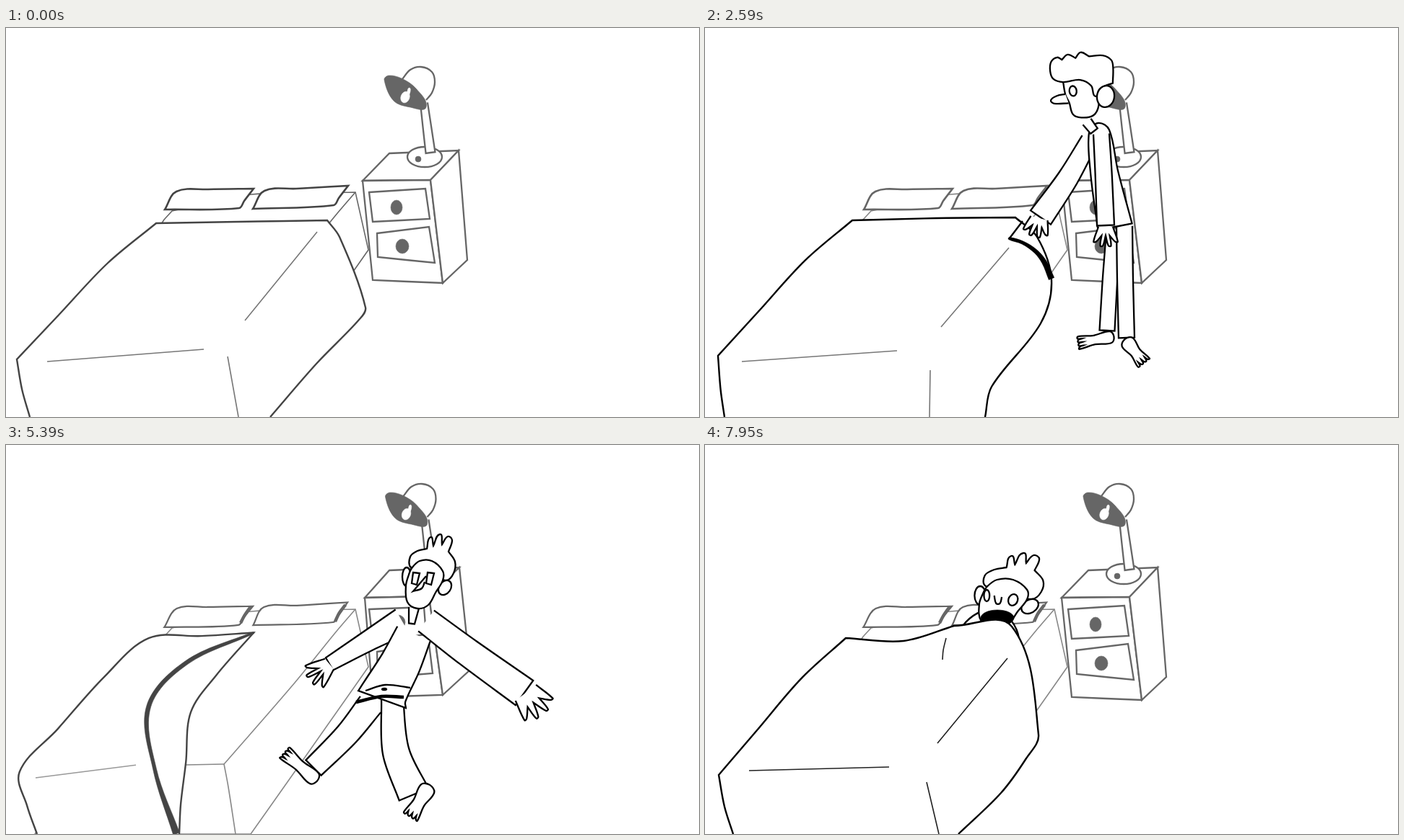
Recreate the animation shown at these times as an HTML page with a canvas. Size 960 by 540 pixels, loop 8 s.

```html
<!DOCTYPE html>
<html lang="en">
<head>
<meta charset="utf-8">
<title>Going to bed</title>
<style>
html, body { margin: 0; width: 100%; height: 100%; overflow: hidden; background: #fff; }
canvas { display: block; width: 960px; height: 540px; }
</style>
</head>
<body>
<canvas id="stage" width="960" height="540"></canvas>
<script>
const ctx = document.getElementById('stage').getContext('2d');
const LOOP = 8000;
const { sin, cos, PI, min, max, hypot, atan2 } = Math;

const span = (t, from, to) => max(0, min(1, (t - from) / (to - from)));
const ease = k => k * k * (3 - 2 * k);
const lerp = (a, b, k) => a + (b - a) * k;
const pairs = nums => Array.from({ length: nums.length / 2 }, (_, i) => nums.slice(2 * i, 2 * i + 2));
const blend = (a, b, k) => Object.fromEntries(Object.keys(a).map(
  key => [key, a[key].map((v, i) => lerp(v, b[key][i], k))]));

// ---- Pen -------------------------------------------------------------
let pen;
const setPen = (ink, width = 2.2, wobble = 0) => { pen = { ink, width, wobble }; };

// Line weight stays the same under any transform of the path.
function finish(kind) {
  ctx.save();
  ctx.setTransform(1, 0, 0, 1, 0, 0);
  ctx.fillStyle = kind === 'b' ? pen.ink : '#fff';
  ctx.strokeStyle = pen.ink;
  ctx.lineWidth = kind === 'b' ? .6 : kind === '=' ? pen.width * 2 : pen.width;
  if (kind !== '-' && kind !== '=') ctx.fill();
  ctx.stroke();
  ctx.restore();
}

// Smooth curve through points; a doubled point is a sharp corner.
// Kinds: - line, = heavy line, o open white, c closed white, b solid.
function paint(kind, points) {
  const closed = kind === 'c' || kind === 'b';
  const p = points.map(([x, y]) => y >= 540 ? [x, y]
    : [x + pen.wobble * sin(x * .7 + y), y + pen.wobble * cos(x + y * .6)]);
  const n = p.length;
  const at = i => closed ? p[(i + n) % n] : p[max(0, min(n - 1, i))];
  ctx.beginPath();
  ctx.moveTo(...p[0]);
  for (let i = 0; i < n - !closed; i++) {
    const [a, b, c, d] = [at(i - 1), at(i), at(i + 1), at(i + 2)];
    const reach = hypot(c[0] - b[0], c[1] - b[1]) / 3;
    const handle = (from, to) => {
      const angle = atan2(to[1] - from[1], to[0] - from[0]);
      return [cos(angle) * reach, sin(angle) * reach];
    };
    const [ux, uy] = handle(a, c), [vx, vy] = handle(b, d);
    ctx.bezierCurveTo(b[0] + ux, b[1] + uy, c[0] - vx, c[1] - vy, ...c);
  }
  if (closed) ctx.closePath();
  finish(kind);
}

// "x,y x,y! ..." with "!" for a corner.
const shape = (kind, text) => paint(kind, text.split(' ').flatMap(token => {
  const point = token.split(',').map(parseFloat);
  return token.endsWith('!') ? [point, point] : [point];
}));
const line = (...nums) => paint('-', pairs(nums));

function oval(x, y, rx, ry, degrees = 0, kind = 'c') {
  ctx.beginPath();
  ctx.ellipse(x, y, rx, ry, degrees * PI / 180, 0, 2 * PI);
  finish(kind);
}

function place({ x = 0, y = 0, turn = 0, px = 0, py = 0, sx = 1, sy = sx }, inside) {
  ctx.save();
  ctx.translate(px + x, py + y);
  ctx.rotate(turn * PI / 180);
  ctx.scale(sx, sy);
  ctx.translate(-px, -py);
  inside();
  ctx.restore();
}

// Tapered tube along a centre line: start width, end width, points.
function tube([w0, w1, ...nums], { cap = false, kind } = {}) {
  const mid = pairs(nums), last = mid.length - 1, left = [], right = [];
  mid.forEach(([x, y], i) => {
    const [ax, ay] = mid[max(0, i - 1)], [bx, by] = mid[min(last, i + 1)];
    const angle = atan2(by - ay, bx - ax), half = lerp(w0, w1, i / last) / 2;
    left.push([x + half * sin(angle), y - half * cos(angle)]);
    right.unshift([x - half * sin(angle), y + half * cos(angle)]);
    if (cap && i === 0) left.unshift([x - .4 * w0 * cos(angle), y - .4 * w0 * sin(angle)]);
  });
  paint(kind || (cap ? 'c' : 'o'), [...left, left.at(-1), right[0], ...right]);
}

// ---- Figure ----------------------------------------------------------
function hand([x, y, turn, length, width]) {
  const points = [[0, -width / 2]];
  for (let i = 0; i < 4; i++) {
    const side = (i - 1.5) / 1.5, tip = length * (1 - .15 * side * side);
    const tx = cos(side * .45) * tip, ty = side * width * .25 + sin(side * .45) * tip;
    points.push([tx, ty - 1.8], [tx, ty + 1.8]);
    const valley = [length * .45, (i - 1) * width * .28];
    if (i < 3) points.push(valley, valley);
  }
  points.push([0, width / 2]);
  place({ x, y, turn }, () => paint('o', points));
}

function foot([x, y, toeX, toeY, width]) {
  const length = hypot(toeX - x, toeY - y);
  const points = [[0, -.45 * width], [-.25 * width, 0], [0, .45 * width], [length * .5, .35 * width]];
  for (let i = 0; i < 4; i++) {
    const across = width * (.4 - i * .27), valley = [length - 6, across - width * .13];
    points.push([length - 1, across + 1.5], [length, across - 1.5]);
    if (i < 3) points.push(valley, valley);
  }
  points.push([length * .5, -.35 * width]);
  place({ x, y, turn: atan2(toeY - y, toeX - x) * 180 / PI }, () => paint('c', points));
}

// Side view, built around the ear.
function profile([x, y, turn, sx]) {
  place({ x, y, turn, sx }, () => {
    shape('o', '-56,-27 -55,-9 -51,3 -48,19 -37,25 -20,24 -11,11 -12,-4! -12,-30');
    shape('o', '-55,-10! -67,-9 -76,-4 -72,1 -52,3');
    shape('c', '-56,-27 -69,-33 -72,-44 -69,-57 -60,-62 -54,-58! -45,-64 -35,-58! -27,-65 -16,-58! 3,-57 14,-49 15,-37 12,-17! 2,-15 -8,-10 -12,-2 -16,-4 -18,-17 -32,-27');
    oval(0, 0, 12, 15, 15);
    oval(-44, -13, 5, 7);
  });
}

// Front view, built around the point between the ears.
function frontHead(x, y, sx, features) {
  place({ x, y, sx, sy: 1 }, () => {
    shape('c', '-20,-20 -21,-35 -11,-43 2,-46! 7,-62 11,-50! 20,-66 23,-52! 31,-63 37,-58 32,-42! 41,-28 39,-12 29,-2 9,-10');
    oval(-26, -7, 6, 13);
    oval(27, 8, 8, 11, 35);
    shape('c', '-23,-10 -27,5 -25,28 -11,37 4,32 14,15 24,-2 24,-15 9,-29 -8,-29 -19,-19');
    features();
  });
}

// Limbs: widths and centre line. Hands: place, angle, length, width.
// Feet: heel, toes, width. Head: ear, angle, size.
const WALK = {
  backLeg: [30, 18, 575, 290, 557, 338, 603, 401], backFoot: [613, 405, 591, 431, 18],
  frontLeg: [38, 26, 583, 268, 567, 340, 569, 419], frontFoot: [577, 431, 510, 436, 17],
  backArm: [16, 16, 560, 150, 565, 200, 572, 255], backHand: [572, 255, 90, 6, 10],
  torso: [34, 45, 558, 145, 563, 195, 580, 265], neck: [17, 6, 548, 130, 546, 152],
  frontArm: [20, 20, 567, 155, 567, 200, 572, 279], frontHand: [574, 280, 90, 29, 19],
  head: [554, 92, -44, .84]
};
const REACH = {
  backLeg: [20, 21, 566, 283, 561, 350, 557, 420], backFoot: [562, 429, 517, 437, 18],
  frontLeg: [22, 22, 581, 275, 582, 350, 584, 430], frontFoot: [585, 436, 608, 465, 21],
  backArm: [24, 34, 533, 155, 503, 208, 465, 263], backHand: [463, 264, 105, 26, 24],
  torso: [28, 48, 546, 143, 553, 200, 568, 276], neck: [14, 12, 529, 130, 539, 143],
  frontArm: [22, 24, 549, 147, 552, 200, 555, 274], frontHand: [555, 276, 90, 27, 20],
  head: [555, 95, -7, 1]
};
const STAND = {
  backLeg: [22, 25, 557, 278, 556, 350, 555, 414], backFoot: [565, 426, 522, 434, 20],
  frontLeg: [34, 28, 561, 278, 573, 340, 582, 412], frontFoot: [579, 427, 609, 455, 22],
  backArm: [16, 16, 553, 170, 553, 200, 555, 262], backHand: [555, 262, 90, 6, 10],
  torso: [34, 47, 552, 156, 552, 205, 554, 277], neck: [18, 12, 546, 122, 546, 150],
  frontArm: [20, 23, 560, 180, 562, 220, 567, 276], frontHand: [567, 277, 90, 20, 21],
  head: [572, 99, 0, 1]
};
const LIE = {
  backLeg: [30, 30, 672, 413, 600, 418, 525, 420], backFoot: [513, 440, 513, 392, 14],
  frontLeg: [34, 35, 672, 417, 600, 421, 519, 422], frontFoot: [513, 438, 512, 391, 15],
  backArm: [10, 20, 755, 393, 715, 384, 680, 379], backHand: [680, 379, 178, 25, 17],
  torso: [28, 48, 803, 413, 740, 412, 674, 413], neck: [14, 18, 825, 402, 799, 404],
  frontArm: [22, 27, 798, 424, 750, 451, 692, 483], frontHand: [692, 487, 164, 56, 25],
  head: [858, 405, 48, .97]
};
const LEAP = {
  backLeg: [36, 30, 325, 320, 292, 362, 246, 408], backFoot: [247, 423, 206, 387, 21],
  frontLeg: [30, 44, 355, 312, 360, 385, 385, 445], frontFoot: [404, 437, 380, 476, 24],
  backArm: [38, 20, 369, 205, 325, 230, 268, 264], backHand: [268, 264, 140, 35, 19],
  torso: [50, 70, 385, 222, 367, 262, 345, 302, 341, 313], neck: [14, 8, 385, 186, 382, 208],
  frontArm: [36, 42, 402, 204, 460, 248, 538, 304], frontHand: [540, 304, 52, 38, 36]
};
const swapLegs = p => ({
  ...p, backLeg: p.frontLeg, backFoot: p.frontFoot, frontLeg: p.backLeg, frontFoot: p.backFoot
});

function legs(p) {
  tube(p.backLeg); foot(p.backFoot);
  tube(p.frontLeg); foot(p.frontFoot);
}

function sideFigure(p, move = {}) {
  place(move, () => {
    legs(p);
    tube(p.backArm); hand(p.backHand);
    tube(p.torso, { cap: true }); tube(p.neck);
    tube(p.frontArm); hand(p.frontHand);
    profile(p.head);
  });
}

function leaper(move) {
  place(move, () => {
    legs(LEAP);
    tube(LEAP.backArm); hand(LEAP.backHand);
    tube(LEAP.frontArm); hand(LEAP.frontHand);
    tube(LEAP.torso); tube(LEAP.neck);
    shape('-', '318,301 345,293 380,297');
    shape('=', '305,317 340,309 371,310');
    oval(344, 299, 4, 2, 0, 'b');
    frontHead(401, 150, 1, () => {
      for (const x of [-17, 3]) paint('c', pairs([x, -13, x, -13, x + 9, -12, x + 9, -12, x + 5, 4, x + 5, 4, x - 2, 2, x - 2, 2]));
      shape('-', '1,-8 -17,13! -5,9 -1,0');
    });
  });
}

function walk(t) {
  const left = max(0, 1390 - t) / 80;
  const stride = .5 - .5 * cos(left * PI / 4);
  const arrive = ease(span(t, 1710, 2190));
  const stepping = blend(WALK, swapLegs(WALK), stride);
  sideFigure(blend(stepping, REACH, arrive), { x: left * 45 });
}

function pull(t) {
  const turn = 10 * sin(PI * span(t, 2670, 3230));
  sideFigure(blend(REACH, STAND, ease(span(t, 2910, 3310))), { turn, px: 570, py: 440 });
}

const tilted = k => sideFigure(STAND, { x: -45 * k, turn: 86 * k, px: 560, py: 440 });

function leap(t) {
  const u = span(t, 5390, 6110);
  const bounce = 14 * Math.abs(sin((t - 6270) / 75)) * (1 - span(t, 6270, 6590));
  const fall = 48 * span(t, 6110, 6270) - (t > 6270 ? bounce : 0);
  leaper({ x: 180 * (1 - u), y: 40 * (1 - u) - 800 * u * (1 - u) + fall });
}

function figure(t) {
  setPen('#000', 2.3);
  if (t < 510 || t >= 6750) return;
  if (t < 2190) walk(t);
  else if (t < 3700) pull(t);
  else if (t < 4190) tilted(span(t, 3700, 4190) ** 2);
  else if (t < 4830) sideFigure(LIE);
  else if (t < 5390) tilted((1 - span(t, 4750, 5230)) ** 2);
  else leap(t);
}

function sleeper(t) {
  setPen('#000', 2.3);
  tube([80, 90, 396, 260, 380, 330, 325, 430], { cap: true });
  frontHead(415, 216, 1.3, () => {
    oval(-19, -7, 3, 8);
    oval(9, -1, 5, 8, 10);
    shape('-', '-11,-7 -9,4 -5,4 -3,-5');
  });
  const yawn = span(t, 7470, 7790);
  if (yawn) oval(405, 240, 23 * yawn, 11 * yawn, 0, 'b');
}

// ---- Room ------------------------------------------------------------
// Two drawings of the furniture, s = 0 or 1, a few pixels apart.
function nightstand(s) {
  setPen('#666', 2.3);
  const back = [531, 174], left = [494 + 3 * s, 212], right = [627 + s, 170];
  const front = [588 - 2 * s, 211 - s], low = [605, 354 - 7 * s];
  const poly = (...corners) => paint('c', corners.flatMap(p => [p, p]));
  poly(left, back, right, front);
  poly(left, front, low, [508, 350]);
  poly(front, right, [639 + 4 * s, 322 - 10 * s], low);
  poly([503, 228], [581 - 2 * s, 223 + 2 * s], [587 - 5 * s, 265 - 2 * s], [508, 269 + 3 * s]);
  poly([514, 285 + 2 * s], [586, 276], [594 - 3 * s, 326 - 9 * s], [515, 318 + 5 * s]);
  oval(541 + 2 * s, 249 - 3 * s, 8 + 2 * s, 10, 0, 'b');
  oval(549 + s, 303 - 2 * s, 9, 10, 0, 'b');
  place({ x: 1.5 * s }, lamp);
}

function lamp() {
  oval(580, 179, 24, 14);
  oval(571, 182, 4, 4, 0, 'b');
  tube([10, 13, 579, 104, 583, 135, 588, 173]);
  shape('o', '549,71 560,58 575,54 590,61 594,75 590,90 582,100');
  shape('b', '524,72 530,66 548,70 568,84 582,110 560,110 537,101');
  setPen('#fff');
  oval(553, 96, 6, 8, 20, 'b');
  oval(558, 88, 2, 5, 10, 'b');
}

function pillow(x0, y0, x1, y1, shaded) {
  const lowX = x1 - 20, lowY = y1 + 27;
  shape('c', `${x0},${y0}! ${x0 + 16},${y0 - 25} ${x0 + 60},${y0 - 28} ${x1},${y1}! ${lowX + 7},${lowY - 10} ${lowX},${lowY}`);
  if (shaded) shape('=', `${x1 - 3},${y1 + 2} ${lowX + 8},${lowY - 13} ${lowX + 3},${lowY - 2}`);
}

function mattress() {
  shape('c', '219,266! 230,254! 340,231 484,228! 502,308! 420,425 339,540! 40,540!');
  shape('-', '484,228 455,262 400,330 302,443! 308,475 318,540');
  line(302, 443, 250, 444);
}

// Edge: foot x, foot corner, head corner, sag, tip, four points down the
// far side, hem x. Creases: foot, side, front. Band: the turned-over hem.
const CLOSED = {
  edge: [33, 15, 460, 208, 271, 320, 269, 445, 267, 462, 290, 498, 388, 489, 405, 430, 466, 366],
  creases: [57, 463, 274, 446, 431, 283, 331, 406, 307, 456, 322, 540]
};
const LIFT = {
  edge: [27, 18, 455, 204, 267, 320, 264, 430, 263, 460, 290, 480, 350, 465, 410, 397, 498, 388],
  creases: [51, 463, 266, 448, 421, 305, 327, 415, 312, 475, 311, 540],
  band: [3, 8, 421, 292, 440, 298, 458, 310, 470, 325, 480, 348]
};
const OPEN = {
  edge: [43, 19, 455, 198, 267, 270, 266, 344, 261, 290, 320, 257, 372, 250, 440, 243, 500, 240],
  creases: [40, 463, 181, 444, 421, 305, 327, 415, 312, 475, 311, 540],
  band: [1, 9, 344, 261, 250, 302, 197, 364, 206, 450, 236, 540]
};
const COVER = {
  edge: [39, 19, 458, 195, 268, 275, 272, 345, 251, 425, 252, 462, 402, 445, 435, 410, 483, 351],
  creases: [61, 452, 255, 447, 419, 296, 322, 414, 307, 468, 324, 540],
  band: LIFT.band
};

function sheet([footX, ...rest], soft) {
  const hemX = rest.pop(), points = pairs(rest), [corner, head] = points;
  const bow = [.3, .65].map(k => [lerp(corner[0], head[0], k), lerp(corner[1], head[1], k) - 16 * k]);
  const twice = p => soft ? [p] : [p, p];
  const tip = points[3];
  paint('o', [[footX, 540], [lerp(corner[0], footX, .4), 502], ...twice(corner), ...bow, ...twice(head),
    points[2], tip, tip, ...points.slice(4), [hemX, 540]]);
}

function blanket(t, odd) {
  const opening = ease(span(t, 2670, 3150)), covering = ease(span(t, 7230, 7550));
  const lifted = t >= 2190;
  const state = !lifted ? 'closed' : opening < .5 ? 'lift' : covering < .5 ? 'open' : 'cover';
  const bold = state === 'lift' || state === 'cover';
  const now = !lifted ? CLOSED : covering ? blend(OPEN, COVER, covering) : blend(LIFT, OPEN, opening);
  const wobble = odd === (state !== 'cover') ? 1.2 : 0;
  setPen(bold ? '#000' : '#444', 2.4, wobble);
  sheet(now.edge, odd && state === 'open');
  if (lifted && covering < 1) tube(now.band, { kind: 'b' });
  if (lifted && !opening) line(440, 268, 421, 293);
  setPen(state === 'cover' ? '#222' : state === 'open' ? '#999' : '#777', 1.6, wobble);
  const creases = pairs(pairs(now.creases));
  for (const crease of state === 'open' ? creases.slice(0, 1) : creases) paint('-', crease);
  if (state === 'cover') shape('-', '334,268 330,285 329,298');
}

function scene(t) {
  const odd = (t < 510 ? t / 170 : 3 + Math.floor((t - 510) / 160)) % 2 === 1;
  const second = t >= 3150;
  ctx.fillStyle = '#fff';
  ctx.fillRect(0, 0, 960, 540);
  nightstand(second && t < 7550 ? 1 : 0);
  setPen(t < 2190 ? '#666' : '#888', 1.6);
  mattress();
  setPen(t < 2190 ? '#444' : '#666', second ? 2.2 : 2.6, odd ? 1 : 0);
  pillow(220, 252, 343, 223, second);
  pillow(342, 251, 474, 219, second);
  if (t >= 6750) sleeper(t);
  blanket(t, odd);
  figure(t);
}

const start = performance.now();
function tick() {
  const t = max(0, performance.now() - start) % LOOP;
  scene(t < 510 ? Math.floor(t / 170) * 170 : 510 + Math.floor((t - 510) / 80) * 80);
  requestAnimationFrame(tick);
}
tick();
</script>
</body>
</html>
```
